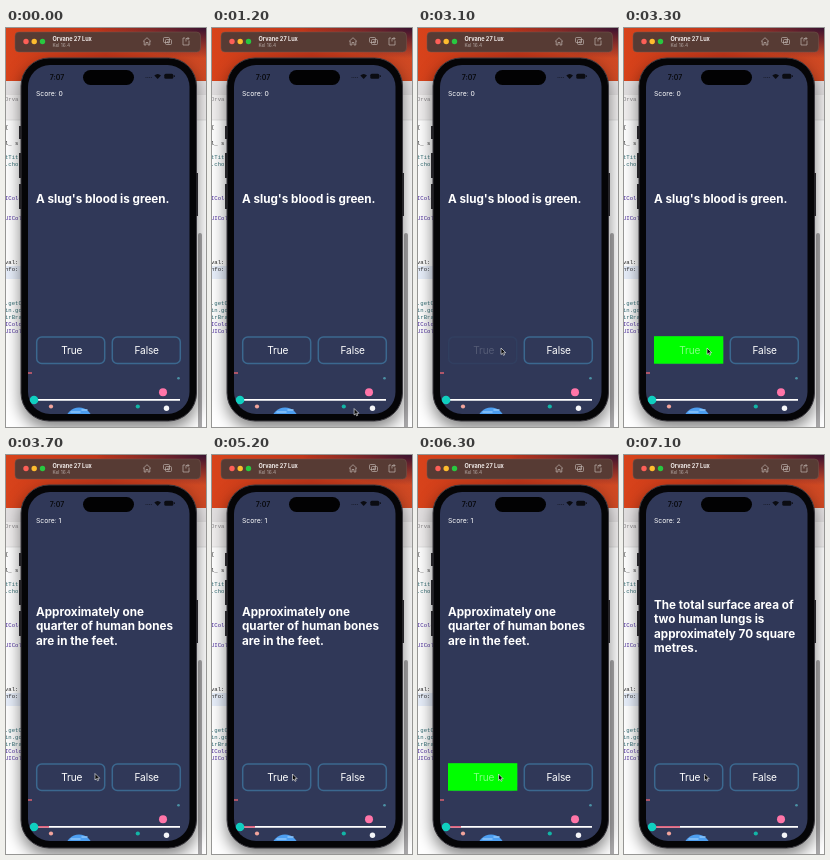
Animation of 200x399 px, one loop 8 s. Source, as an HTML page:

```html
<!DOCTYPE html>
<html lang="en">
<head>
<meta charset="utf-8">
<style>
  html, body { margin: 0; width: 100%; height: 100%; overflow: hidden; background: #fff; }
  svg { display: block; width: 100vw; height: 100vh; font-family: Inter, Roboto, sans-serif; }
  .code { font: 5.6px "Liberation Mono", monospace; fill: #292929; }
  .code .type { fill: #4a2a9c; }
  .code .call { fill: #326d74; }
  .code .tab { fill: #8b898b; }
  .shadow { filter: drop-shadow(0 7px 8px rgba(0, 0, 0, .5)); }
  #question { font-size: 11.7px; font-weight: 700; fill: #fff; }
  .label { font-size: 10.1px; letter-spacing: -.15px; fill: #fff; text-anchor: middle; }
  .box { fill: #303858; stroke: #3b688f; stroke-width: 1.5; }
  .icon { fill: none; stroke: #bdb2ae; stroke-width: .7; }
</style>
</head>
<body>
<svg viewBox="0 0 200 399" preserveAspectRatio="none">
  <defs>
    <linearGradient id="wallpaper">
      <stop offset="0" stop-color="#d8431b"/><stop offset=".5" stop-color="#bf3519"/><stop offset="1" stop-color="#d04a24"/>
    </linearGradient>
    <radialGradient id="dusk" cx="1" cy="0" r=".55">
      <stop offset="0" stop-color="#3a1230"/><stop offset="1" stop-color="#3a1230" stop-opacity="0"/>
    </radialGradient>
    <clipPath id="screen"><rect x="22" y="37" width="161.500" height="349" rx="22"/></clipPath>
  </defs>

  <rect width="200" height="55" fill="url(#wallpaper)"/>
  <rect width="200" height="55" fill="url(#dusk)"/>
  <rect y="53" width="200" height="346" fill="#fff"/>
  <rect y="53" width="200" height="13" fill="#e2dfe0"/>
  <rect y="66" width="200" height="26" fill="#f1efef"/>
  <path d="M0 66.500H200M0 92H200" stroke="#d5d3d3" stroke-width=".6"/>
  <rect y="238" width="15" height="13" fill="#e8effb"/>
  <g class="code" id="code"></g>
  <rect x="192" y="205" width="4" height="198" rx="2" fill="#aaa9ab"/>

  <rect class="shadow" x="15" y="30" width="175.500" height="363" rx="28" fill="#050507" stroke="#3c3a40"/>
  <path d="M14 98V111M14 125V150M14 156V181M191 145V188" stroke="#242327" stroke-width="2"/>

  <rect x="9" y="4" width="185.500" height="20" rx="4" fill="#573b34" stroke="#73564d" stroke-width=".5"/>
  <circle cx="20" cy="13.500" r="2.700" fill="#fe5f57"/>
  <circle cx="28.200" cy="13.500" r="2.700" fill="#febc2e"/>
  <circle cx="36.500" cy="13.500" r="2.700" fill="#28c840"/>
  <text x="46.500" y="13" font-size="5.600" font-weight="700" fill="#f0eae8">Orvane 27 Lux</text>
  <text x="46.500" y="19" font-size="4.800" fill="#b5a9a5">Kel 16.4</text>
  <g class="icon">
    <path d="M137 13.500L141 9.700L145 13.500M138.200 13V17H140V14.500H142V17H143.800V13"/>
    <rect x="157.500" y="9.500" width="6" height="5" rx="1"/><rect x="159.500" y="11.500" width="6" height="5" rx="1"/><circle cx="162.500" cy="14" r="1"/>
    <path d="M179 10H177V17H183V12.500M180 13.500V10.500H183M181.500 9L183 10.500L181.500 12"/>
  </g>

  <g clip-path="url(#screen)">
    <rect x="22" y="37" width="162" height="350" fill="#303858"/>
    <path d="M22 345H26" stroke="#d8606f" stroke-width="1.400"/>
    <circle cx="172.500" cy="350.300" r="1.300" fill="#4b91a5"/>
    <path d="M29 371.800H174" stroke="#fff" stroke-width="1.700"/>
    <path id="progress" stroke="#e0647f" stroke-width="1.700"/>
    <circle cx="157" cy="364.200" r="4" fill="#ff75a8"/>
    <circle cx="28" cy="372" r="4.300" fill="#10cfc0"/>
    <circle cx="45" cy="378.500" r="2.100" fill="#f2a49c"/>
    <circle cx="131.800" cy="378.500" r="2.100" fill="#12b5a6"/>
    <circle cx="160.500" cy="380.200" r="2.700" fill="#f4f5f8"/>
    <circle cx="73" cy="393" r="13.500" fill="#4d9ef0"/>
    <path d="M65 384H74M76 382H81" stroke="#8cc5fa" stroke-width="1.500" stroke-linecap="round"/>
  </g>
  <rect x="77" y="42" width="51" height="15" rx="7.500" fill="#020203"/>
  <text x="51" y="51.700" font-size="7" font-weight="600" text-anchor="middle" fill="#08090d">7:07</text>
  <path d="M139.500 49.500H146" stroke="#1c2033" stroke-dasharray="1 .8"/>
  <path d="M148.300 47.500Q151.700 44.500 155 47.500L151.700 51Z" fill="#0b0c12"/>
  <rect x="158.300" y="45.700" width="9" height="5" rx="1.500" fill="#0b0c12"/>
  <path d="M168.300 47.300V49" stroke="#0b0c12"/>

  <text id="score" x="30" y="67.700" font-size="6.800" fill="#fff"></text>
  <text id="question"></text>
  <rect id="trueBox" class="box" x="30.700" y="309" width="68" height="26.500" rx="5"/>
  <rect id="correct" x="30" y="308.200" width="69.300" height="27.500" fill="#0f0"/>
  <text id="trueLabel" class="label" x="65.700" y="325.700">True</text>
  <rect class="box" x="106.300" y="309" width="68" height="26.500" rx="5"/>
  <text class="label" x="140.700" y="325.700">False</text>
  <path id="cursor" d="M0 0V6.500L1.500 5.200L2.500 7.300L3.600 6.800L2.600 4.700H4.700Z" fill="#080808" stroke="#fff" stroke-width=".6"/>
</svg>
<script>
  const $ = id => document.getElementById(id);
  const LOOP = 8000;

  const questions = [
    { from: 0, y: 175.300, lines: ["A slug's blood is green."] },
    { from: 3450, y: 160.800, lines: ["Approximately one", "quarter of human bones", "are in the feet."] },
    { from: 6500, y: 153.600, lines: ["The total surface area of", "two human lungs is", "approximately 70 square", "metres."] }
  ];
  const presses = [
    { down: 2900, up: 3200, done: 3450 },
    { down: 6000, up: 6200, done: 6500 }
  ];
  // time, x, y of the pointer tip
  const pointerPath = [
    [1000, 150, 390], [1800, 100, 330], [2200, 87, 308], [2400, 87, 308], [2500, 85, 317],
    [2800, 83, 320], [3300, 83, 320], [3600, 89, 318.5], [3900, 89, 318.5], [4400, 86, 318],
    [4600, 86, 318], [4800, 80, 318], [5200, 80.5, 319], [8000, 80.5, 319]
  ];

  $("code").innerHTML = [
    [73, "Orva", "tab"], [101, " {"], [117, "l_ s"], [131, "tTit", "call"], [138, ".cho", "call"],
    [172, "IColo", "type"], [192, "UICol", "type"], [236, "val:"], [243, "nfo:"],
    [277, ".getC", "call"], [284, "in.go", "call"], [291, "irBra", "call"],
    [298, "IColo", "type"], [305, "UICol", "type"]
  ].map(([y, text, kind = ""]) => `<text x="-1" y="${y}" class="${kind}">${text}</text>`).join("");

  const clamp = v => Math.max(0, Math.min(1, v));
  const ease = v => v * v * (3 - 2 * v);

  function pointerAt(t) {
    const i = pointerPath.findIndex(p => p[0] > t);
    const [t0, x0, y0] = pointerPath[i - 1], [t1, x1, y1] = pointerPath[i];
    const k = ease((t - t0) / (t1 - t0));
    return [x0 + (x1 - x0) * k, y0 + (y1 - y0) * k];
  }

  let shown = -1;
  function showQuestion(index) {
    if (index === shown) return;
    shown = index;
    const { y, lines } = questions[index];
    $("score").textContent = "Score: " + index;
    $("question").innerHTML = lines.map((line, i) =>
      `<tspan x="30" y="${y + i * 14.5}">${line}</tspan>`).join("");
    $("progress").setAttribute("d", `M30 371.8h${index * 13}`);
  }

  function draw(now) {
    const t = now % LOOP;
    showQuestion(questions.filter(q => q.from <= t).length - 1);

    const press = presses.find(p => t >= p.down && t < p.done);
    const fade = press ? clamp((t - press.down) / 150) * (1 - clamp((t - press.up) / 250)) : 0;
    $("trueLabel").style.opacity = 1 - .83 * fade;
    $("trueBox").style.strokeOpacity = 1 - .85 * fade;
    $("correct").style.display = press && t >= press.up ? "" : "none";

    const visible = t >= pointerPath[0][0];
    $("cursor").style.display = visible ? "" : "none";
    if (visible) $("cursor").setAttribute("transform", `translate(${pointerAt(t)})`);
    requestAnimationFrame(() => draw(performance.now()));
  }
  draw(performance.now());
</script>
</body>
</html>
```
